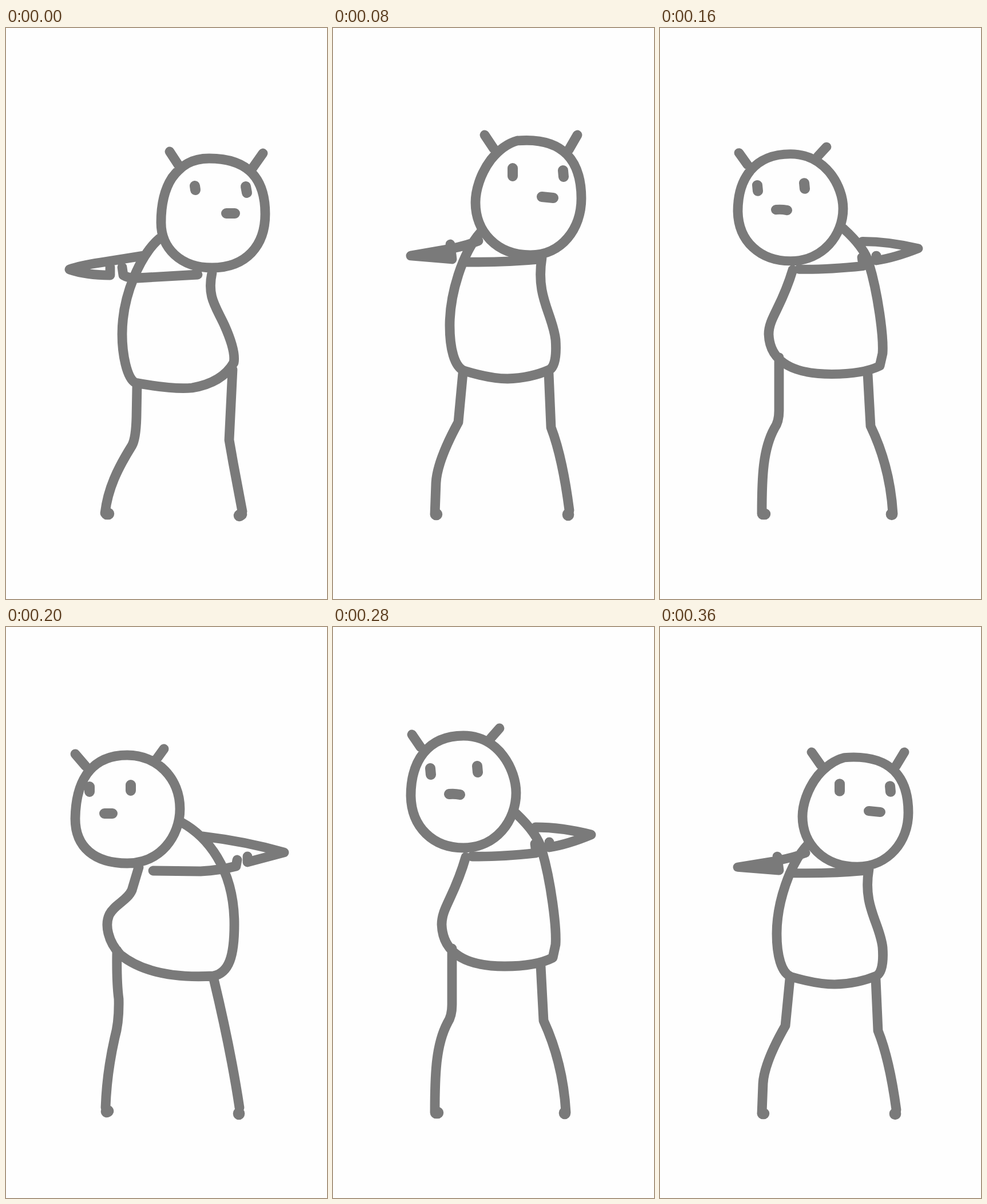
Animation, 561 px wide and 998 px high, one loop 0.4 s. Source, as an HTML page:

```html
<!DOCTYPE html>
<html lang="en">
<head>
<meta charset="utf-8">
<title>Dancing doodle</title>
<style>
  html, body { margin: 0; width: 100%; height: 100%; overflow: hidden; background: #fefefe; }
  svg { display: block; width: 100%; height: 100%; }
  path { fill: none; stroke: #7a7a7a; stroke-width: 16.8; stroke-linecap: round; stroke-linejoin: round; }
  #face { stroke-width: 18; }
  #feet { stroke-width: 20.5; }
</style>
</head>
<body>
<svg viewBox="0 0 561 998">
  <g id="figure"><path id="lines"/><path id="face"/><path id="feet"/></g>
</svg>
<script>
const poses = {
  farRight: {
    ears: 'M286 216L303 242M449 219L430 246',
    head: 'M355 228C325 228 306 240 290 262C275 285 271 315 271 340C271 385 305 419 360 419C420 419 453 380 453 325C453 265 425 228 355 228',
    body: 'M268 368C236 396 203 465 203 535C203 570 211 612 226 620Q290 632 325 629Q378 620 398 585Q402 565 382 520C367 487 351 470 360 428',
    arms: 'M240 398L165 410Q130 415 111 422Q140 432 182 432V418M203 418L205 432Q215 438 230 437L335 431',
    legs: 'M229 625L228 680Q227 718 220 730C195 770 178 805 173 848M396 597L390 720L397 760L413 845',
    face: 'M330 276L331 283M419 277L421 288M385 324H400',
    feet: 'M176 849H179M408 852L411 850'
  },
  right: {
    ears: 'M265 187L281 211M427 187L412 213',
    head: 'M322 197C300 203 285 219 276 230C257 255 249 285 249 305C249 355 285 397 345 397C400 397 434 350 434 298C434 235 405 190 322 197',
    body: 'M258 357C226 393 204 465 204 520C204 560 212 592 229 599Q275 613 305 613Q345 612 379 597Q392 588 389 545C384 500 354 470 365 402',
    arms: 'M254 372Q235 380 205 386L136 398L208 404L205 378M165 397H205M232 409Q300 410 362 404',
    legs: 'M227 603L219 689Q182 757 180 795L178 850M377 603L381 698Q401 750 413 843',
    face: 'M314 245V259M402 249L403 260M365 295L385 297',
    feet: 'M180 850H181M411 851V850'
  },
  center: {
    ears: 'M207 177L226 200M359 166L348 184',
    head: 'M298 180C240 180 204 225 204 278C204 330 240 376 293 378C350 378 387 335 387 285C387 240 360 180 298 180',
    body: 'M238 378C218 440 208 500 206 550Q210 580 300 591Q378 594 382 577Q381 485 360 378',
    arms: 'M240 374L173 383L240 389L292 394M291 368V392M308 397Q350 392 428 379Q390 366 362 365M309 370L306 396M308 388L360 376',
    legs: 'M226 575L217 660Q216 678 211 682C180 708 174 760 176 835L183 851M365 590Q360 640 361 686C385 715 410 770 410 835L408 850',
    face: 'M244 230L246 240M330 230L331 240M282 274H300',
    feet: 'M183 850V849M408 850V848'
  },
  left: {
    ears: 'M138 188L153 210M291 177L276 194',
    head: 'M228 190C165 190 136 235 136 295C137 350 175 386 228 386C285 386 320 338 320 290C320 250 290 190 228 190',
    body: 'M320 326Q358 362 365 390C381 445 391 525 389 555L384 578Q355 593 300 593C240 593 192 575 190 520C190 490 212 472 232 402',
    arms: 'M354 350Q400 350 451 363Q410 380 378 385V376M243 401Q290 402 355 395L353 379',
    legs: 'M208 562V660Q208 680 200 692C180 730 178 780 178 848M363 592L368 688Q402 762 407 848',
    face: 'M170 247L171 258M252 243L253 254M203 292Q212 291 222 293',
    feet: 'M180 849H183M405 850V849'
  },
  farLeft: {
    ears: 'M121 222L139 243M276 213L263 231',
    head: 'M212 224C150 224 122 267 121 335C121 385 155 413 212 413C270 413 304 365 304 318C304 265 265 224 212 224',
    body: 'M306 341C350 365 399 420 399 520C399 575 390 605 362 610C290 614 235 601 200 573C178 550 172 520 181 502C190 485 212 478 220 460L232 420',
    arms: 'M345 366Q420 375 486 394L422 411V401M257 426L340 427Q375 425 402 418L404 407',
    legs: 'M194 565Q193 620 197 650Q198 690 190 718Q176 780 174 840M363 615Q393 740 408 840',
    face: 'M146 279V288M218 276V286M172 326H186',
    feet: 'M176 847L178 846M407 851V850'
  }
};

// Pose and vertical stretch for each step of the dance
const steps = [
  ['farRight', 1], ['farRight', 1.02], ['right', 1], ['center', 1], ['left', 0.955],
  ['farLeft', 1], ['farLeft', 1.02], ['left', 1], ['center', 1.01], ['right', 0.953]
];
const stepTime = 40, floorY = 860;
const [figure, lines, face, feet] =
  ['figure', 'lines', 'face', 'feet'].map(id => document.getElementById(id));
const start = performance.now();

function draw(now) {
  const elapsed = Math.max(0, now - start);
  const [name, stretch] = steps[Math.floor(elapsed / stepTime) % steps.length];
  const pose = poses[name];
  lines.setAttribute('d', pose.ears + pose.head + pose.body + pose.arms + pose.legs);
  face.setAttribute('d', pose.face);
  feet.setAttribute('d', pose.feet);
  figure.setAttribute('transform', `translate(0 ${floorY * (1 - stretch)}) scale(1 ${stretch})`);
  requestAnimationFrame(draw);
}
draw(start);
</script>
</body>
</html>
```
